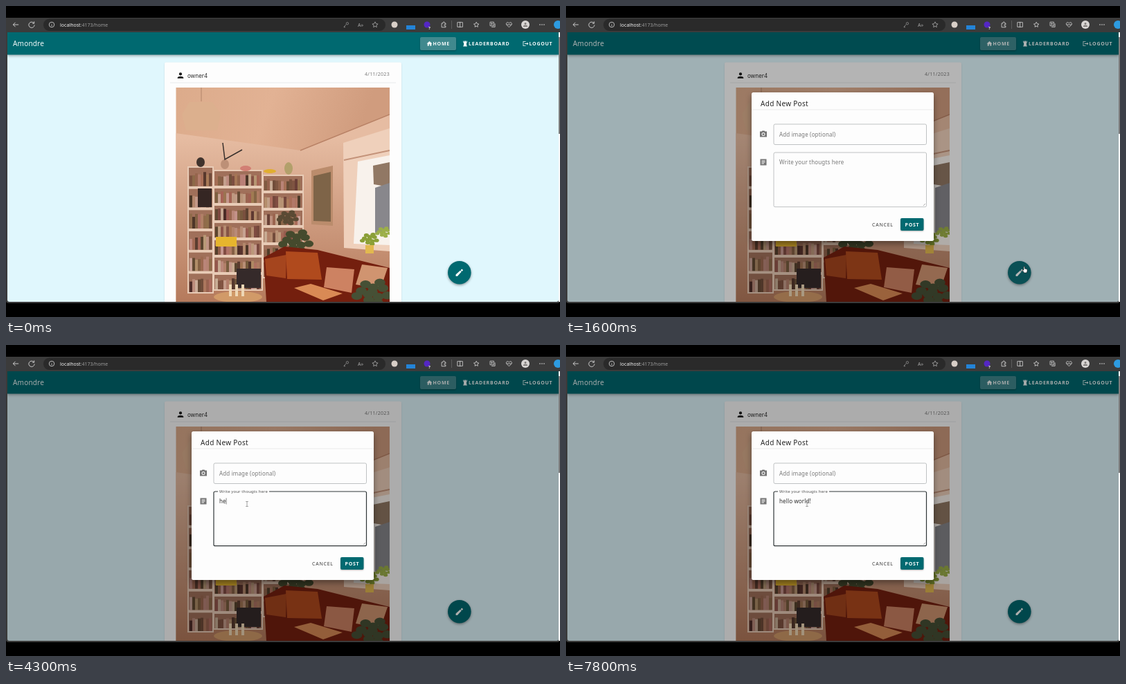
An HTML page with a canvas that plays this animation: 800x450 px, repeating every 8000 ms.

```html
<!DOCTYPE html>
<html lang="en">
<head>
<meta charset="utf-8">
<title>Add a post</title>
<style>
html, body { margin: 0; width: 100%; height: 100%; overflow: hidden; background: #000; }
canvas { display: block; }
</style>
</head>
<body>
<canvas id="stage" width="800" height="450"></canvas>
<script>
const ctx = document.getElementById('stage').getContext('2d');
const LOOP = 8000, STEP = 100;
const UI = '"Noto Sans", "Open Sans", sans-serif';
const TEAL = '#006970', PAPER = '#fdfdfd';

// Icons live on a 24-unit grid
const SOLID = {
  home: 'M10 20v-6h4v6h5v-8h3L12 3 2 12h3v8z',
  pencil: 'M21 6l-3-3-3 3 3 3M3 17v4h4L17 10l-3-3z',
  person: 'M12 4a4 4 0 0 1 0 8a4 4 0 0 1 0-8M4 20v-2c0-5 16-5 16 0v2z',
  camera: 'M2 4h5l2-2h6l2 2h5v16H2zM12 7a5 5 0 0 0 0 10a5 5 0 0 0 0-10m0 2a3 3 0 0 1 0 6a3 3 0 0 1 0-6z',
  note: 'M3 3h18v18H3zM7 7v2h10V7zm0 4v2h10v-2zm0 4v2h7v-2z',
  rook: 'M5 2h2v3h2V2h6v3h2V2h2v6h-2v11h2v3H5v-3h2V8H5z',
  logout: 'M17 7l-1 1 2 3H8v2h10l-2 3 1 1 5-5M4 5h8V3H2v18h10v-2H4z'
};
const STROKED = {
  back: 'M21 12H4M11 5l-7 7 7 7',
  reload: 'M19 7A9 9 0 1 0 21 13M20 2v6h-6',
  info: 'M12 3a9 9 0 0 1 0 18a9 9 0 0 1 0-18M12 11v6M12 7v1',
  key: 'M17 3a4 4 0 0 1 0 9a4 4 0 0 1 0-9M13 11L4 20v2h4v-3',
  star: 'M12 3l3 6 6 1-5 4 1 6-5-3-5 3 1-6-5-4 6-1z',
  puzzle: 'M5 7h5a3 3 0 1 1 5 0h4v5a3 3 0 1 0 0 4v5H5z',
  split: 'M3 4h18v16H3zM12 2v20',
  collections: 'M3 3h13v13H3zM8 20h12V8M9 6v7M6 9h7',
  heart: 'M12 21L3 12C0 6 7 1 12 7c5-6 12-1 9 5zM4 12h16'
};
for (const set of [SOLID, STROKED])
  for (const k in set) set[k] = new Path2D(set[k]);

const clamp = v => Math.max(0, Math.min(1, v));
const mix = (a, b, p) => a + (b - a) * p;
const smooth = p => p * p * (3 - 2 * p);
const progress = (t, from, length) => clamp((t - from) / length);

function rect(x, y, w, h, color) {
  ctx.fillStyle = color;
  ctx.fillRect(x, y, w, h);
}
function round(x, y, w, h, r, fill, stroke, width = 1) {
  ctx.beginPath();
  ctx.roundRect(x, y, w, h, r);
  if (fill) { ctx.fillStyle = fill; ctx.fill(); }
  if (stroke) { ctx.strokeStyle = stroke; ctx.lineWidth = width; ctx.stroke(); }
}
function oval(x, y, rx, ry, color) {
  ctx.beginPath();
  ctx.ellipse(x, y, rx, ry, 0, 0, 7);
  ctx.fillStyle = color;
  ctx.fill();
}
function trace(points) {
  ctx.beginPath();
  for (let i = 0; i < points.length; i += 2) ctx.lineTo(points[i], points[i + 1]);
}
function poly(color, ...points) {
  trace(points);
  ctx.fillStyle = color;
  ctx.fill();
}
function line(color, width, ...points) {
  trace(points);
  ctx.strokeStyle = color;
  ctx.lineWidth = width;
  ctx.stroke();
}
function text(s, x, y, size, color, weight = 400, spacing = 0.15) {
  ctx.font = `${weight} ${size}px ${UI}`;
  ctx.letterSpacing = spacing + 'px';
  ctx.fillStyle = color;
  ctx.fillText(s, x, y);
  return ctx.measureText(s).width;
}
function icon(name, x, y, size, color) {
  ctx.save();
  ctx.translate(x - size / 2, y - size / 2);
  ctx.scale(size / 24, size / 24);
  ctx.fillStyle = ctx.strokeStyle = color;
  ctx.lineWidth = 20 / size;
  if (SOLID[name]) ctx.fill(SOLID[name], 'evenodd');
  else ctx.stroke(STROKED[name]);
  ctx.restore();
}
function shaded(blur, dy, alpha, paint) {
  ctx.shadowColor = `rgba(0,0,0,${alpha})`;
  ctx.shadowBlur = blur;
  ctx.shadowOffsetY = dy;
  paint();
  ctx.shadowColor = 'transparent';
}

function toolbar() {
  const y = 27;
  rect(0, 17, 800, 21, '#3b3b3b');
  round(54, 18.5, 494, 17.5, 8.7, '#2a2a2a');
  icon('back', 14, y, 11, '#e4e4e4');
  icon('reload', 37, y, 11, '#e4e4e4');
  icon('info', 66, y, 10, '#d8d8d8');
  const w = text('localhost', 78, 30, 7, '#f4f4f4', 400, 0);
  text(':4173/home', 78 + w, 30, 7, '#9c9c9c', 400, 0);
  icon('key', 491, y, 9, '#8c8c8c');
  text('A»', 508, 30, 7, '#a8a8a8', 400, 0);
  icon('star', 533, y, 11, '#a8a8a8');
  oval(561, y, 4.5, 4.5, '#d8cfc8');
  rect(578, 28, 13, 6, '#2384d8');
  oval(608, y, 4.5, 4.5, '#5427c4');
  text('?', 610, 34, 6, '#fff', 700, 0);
  rect(643, 21, 1, 12, '#5c5c5c');
  ['puzzle', 'split', 'star', 'collections', 'heart'].forEach((name, i) =>
    icon(name, 632 + 23.6 * i, y, 10, '#d4d4d4'));
  oval(750, y, 6, 6, '#d9d6d4');
  icon('person', 750, y, 9, '#807c7a');
  for (let x = 771; x < 780; x += 3) oval(x, y, 0.8, 0.8, '#dcdcdc');
  oval(797, y, 6, 6, '#2d9be0');
}

// Bookcase: rows of seeded spines
function shelf(x, y, w, bottom, rows, rand) {
  rect(x, y, w, bottom - y, '#e8cbb6');
  const pitch = (bottom - y) / rows;
  for (let r = 0; r < rows; r++) {
    const top = y + r * pitch + 2, base = top + pitch - 4;
    rect(x + 2, top, w - 4, base - top, '#a0705a');
    for (let bx = x + 3; bx < x + w - 6; bx += 4) {
      const h = pitch * mix(0.5, 0.7, rand());
      rect(bx, base - h, 4, h, `hsl(${mix(8, 32, rand())} 32% ${mix(22, 70, rand())}%)`);
    }
  }
}

function leaves(x, y, r, color) {
  for (let i = 0; i < 12; i++) {
    const a = i * 2.4, d = r * Math.sqrt(i / 12);
    oval(x + d * Math.cos(a), y + d * 0.6 * Math.sin(a), r * 0.28, r * 0.2, color);
  }
}

// Room picture in a few flat tones
function photo() {
  let seed = 11;
  const rand = () => (seed = (seed * 16807) % 2147483647) / 2147483647;
  ctx.save();
  ctx.beginPath();
  ctx.rect(245.5, 118, 308.5, 310);
  ctx.clip();
  const ceiling = ctx.createLinearGradient(246, 118, 500, 210);
  ceiling.addColorStop(0, '#dcab8b');
  ceiling.addColorStop(0.5, '#e2b294');
  ceiling.addColorStop(1, '#d09c7e');
  rect(245, 118, 310, 310, ceiling);
  const wall = ctx.createLinearGradient(0, 190, 0, 428);
  wall.addColorStop(0, '#e6bca2');
  wall.addColorStop(1, '#b57a5c');
  poly(wall, 245, 184, 425, 209, 554, 157, 554, 428, 245, 428);
  line('#b98266', 1.5, 425, 209, 554, 157);

  line('#a87d62', 0.8, 282, 118, 282, 138);
  poly('#dcb08e', 265, 139, 298, 139, 310, 156, 305, 180, 260, 180, 254, 157);

  shelf(262, 232, 38, 416, 6, rand);
  shelf(299, 237, 72, 412, 7, rand);
  shelf(370, 244, 60, 394, 6, rand);
  rect(277, 264, 20, 27, '#352623');
  rect(303, 334, 30, 14, '#e6b52e');
  rect(333, 380, 35, 28, '#352a2a');
  oval(281, 226, 6, 7, '#40332d');
  oval(316, 229, 6, 7, '#bd9077');
  line('#38302c', 1.5, 316, 222, 313, 198, 316, 222, 341, 208);
  oval(346, 235, 8, 4, '#d27f74');
  oval(381, 239, 9, 3, '#e0ae30');
  oval(408, 235, 6, 9, '#b2a06b');
  leaves(407, 306, 15, '#5a4a34');
  leaves(419, 340, 24, '#454a2d');

  poly('#bb8c6c', 441, 238, 472, 231, 472, 318, 441, 316);
  poly('#7e6448', 444, 246, 469, 240, 469, 312, 444, 311);

  poly('#efd0bb', 487, 198, 554, 177, 554, 355, 488, 350);
  line('#c4937a', 2, 488, 223, 554, 209);
  poly('#f8f2ec', 508, 225, 554, 216, 554, 346, 502, 344);
  poly('#917864', 530, 231, 554, 226, 554, 262, 531, 258);
  poly('#88878c', 533, 263, 554, 256, 554, 326, 533, 328);
  leaves(525, 337, 13, '#8b9f37');
  leaves(545, 327, 11, '#9caf48');
  rect(519, 346, 12, 12, '#e2b94f');

  poly('#741f0e', 372, 364, 402, 348, 450, 353, 554, 379, 554, 428, 376, 428);
  poly('#d98a55', 416, 408, 440, 402, 486, 416, 458, 426);
  poly('#a5451e', 374, 366, 405, 360, 404, 394, 376, 390);
  poly('#b04a1d', 404, 355, 450, 357, 456, 396, 406, 395);
  poly('#cd8262', 463, 378, 503, 381, 499, 415, 459, 407);
  poly('#d09470', 514, 374, 551, 379, 541, 409, 505, 403);
  leaves(529, 414, 28, '#465035');
  oval(335, 421, 35, 8, '#d19a68');
  for (let x = 322; x < 345; x += 9) rect(x, 403, 4, 17, '#eed7b5');
  ctx.restore();
}

function header() {
  shaded(4, 1.5, 0.35, () => rect(2, 38, 796, 32.5, TEAL));
  text('Amondre', 10, 58, 10, '#f4fafa', 500, 0.2);
  shaded(2, 1, 0.3, () => round(598, 45, 52, 19, 2, '#40898e'));
  for (const [name, x] of [['home', 616.5], ['rook', 668], ['logout', 755.5]]) {
    const label = name === 'rook' ? 'leaderboard' : name;
    icon(name, x - 5, 54.5, 9.5, '#f4fafa');
    text(label.toUpperCase(), x, 57, 7, '#f4fafa', 600, 0.75);
  }
}

function page() {
  rect(2, 38, 796, 390, '#e0f7fd');
  shaded(2, 1, 0.15, () => round(229, 81.5, 342, 360, 2, PAPER));
  icon('person', 252, 100.5, 13, '#1c1c1c');
  text('owner4', 262, 103.5, 8, '#2a2a2a', 400, 0.1);
  text('4/11/2023', 518, 101, 7, '#7c7c7c', 400, 0.3);
  rect(237, 110.5, 326, 1, '#e8eaeb');
  photo();
  header();
}

function fabTint(t) {
  if (t < 1500) return 0.5 * progress(t, 500, 500);
  if (t < 1600) return 0.14;
  return 0.055 * (1 - progress(t, 2600, 700));
}

function fab(t) {
  const x = 654.8, y = 385.7, r = 16.8;
  const lift = t >= 1200 && t < 1500 ? 2.5 : 1.5;
  shaded(lift * 2.5, lift, 0.4, () => oval(x, y, r, r, TEAL));
  oval(x, y, r, r, `rgba(255,255,255,${fabTint(t)})`);
  icon('pencil', x, y, 14, '#fff');
}

// Each burst types its letters at a steady pace
const BURSTS = [
  { letters: 'hello', at: 4120, every: 180 },
  { letters: ' w', at: 5420, every: 290 },
  { letters: 'orld!', at: 5850, every: 315 }
];

function typing(t) {
  let message = '', last = -LOOP;
  for (const { letters, at, every } of BURSTS) {
    if (t < at) break;
    const n = Math.min(letters.length, Math.floor((t - at) / every) + 1);
    message += letters.slice(0, n);
    last = at + (n - 1) * every;
  }
  return { message, caret: t - last < 500 };
}

function thoughts(t) {
  const focused = t >= 2700, hovered = t >= 2200;
  const edge = focused ? '#303638' : hovered ? '#5a5f61' : '#b8bcbd';
  round(300, 212, 220.5, 78.7, 2, null, edge, focused ? 1.2 : 0.9);
  line('#777', 0.6, 516, 289, 519, 286);

  const lift = smooth(progress(t, 2650, 200)), scale = mix(1, 0.75, lift);
  if (lift) rect(306, 210.5, 74 * lift, 3, PAPER);
  ctx.save();
  ctx.translate(308, mix(229, 214, lift));
  ctx.scale(scale, scale);
  text('Write your thougts here', 0, 0, 8, lift ? '#555' : '#777');
  ctx.restore();

  const { message, caret } = typing(t);
  const w = text(message, 308, 228.5, 8, '#2c2c2c');
  if (caret) rect(308 + w, 221.5, 0.6, 9, '#333');
}

function dialog(t) {
  const p = progress(t, 1420, 150);
  if (!p) return;
  const scale = 1 - 0.2 * (1 - p) ** 3, cx = 399.5, cy = 232.5;
  ctx.save();
  ctx.globalAlpha = 1 - (1 - p) ** 2.7;
  ctx.translate(cx, cy);
  ctx.scale(scale, scale);
  ctx.translate(-cx, -cy);
  shaded(9, 4, 0.4, () => round(268, 125, 263, 215, 2.5, PAPER));
  text('Add New Post', 281, 144.5, 10, '#262626', 500, 0.3);
  rect(268, 149.5, 263, 1, '#ececec');

  icon('camera', 285, 185.5, 12, '#747474');
  icon('note', 285, 226, 12, '#747474');
  round(300, 171, 220.5, 29.5, 2, null, '#b8bcbd', 0.9);
  text('Add image (optional)', 308, 188.5, 8, '#777');
  thoughts(t);

  text('CANCEL', 442, 319, 7, '#3c3c3c', 500, 0.75);
  shaded(2, 1, 0.3, () => round(483, 307, 33.5, 18, 2, TEAL));
  text('POST', 489.5, 319, 7, '#fff', 600, 0.75);
  ctx.restore();
}

function pointerAt(t) {
  if (t >= 2400) return [348, 230];
  const enter = smooth(progress(t, 600, 400)), go = smooth(progress(t, 1600, 700));
  return [mix(666 - 3 * enter, 348, go), mix(390 - 9 * enter, 237, go)];
}

function pointer(t) {
  if (t < 600) return;
  const [x, y] = pointerAt(t);
  ctx.save();
  ctx.translate(x, y);
  if (t >= 2200) {
    line('#8a8a8a', 0.8, 0, -3.5, 0, 3.5);
    for (const end of [-3.5, 3.5]) line('#8a8a8a', 0.8, -1.8, end, 1.8, end);
  } else {
    const shape = t <= 1600
      ? [-2, -4, -0.5, -4, -0.5, -1, 3, 0, 3, 3, 2, 5, -1.5, 5, -4, 1, -2, 1, -2, -4]
      : [0, 0, 0, 9, 2, 7, 4, 10, 5, 9, 4, 6.5, 6.5, 6.5, 0, 0];
    poly('#fff', ...shape);
    line('#222', 0.6, ...shape);
  }
  ctx.restore();
}

function draw(t) {
  rect(0, 0, 800, 450, '#000');
  round(0, 17, 800, 413, [0, 0, 4, 4], '#3b3b3b');
  ctx.save();
  ctx.beginPath();
  ctx.roundRect(2, 37.5, 796, 390.5, [0, 0, 3, 3]);
  ctx.clip();
  page();
  fab(t);
  rect(2, 37, 796, 392, `rgba(0,0,0,${0.32 * progress(t, 1395, 225)})`);
  dialog(t);
  pointer(t);
  ctx.restore();
  toolbar();
  rect(798, 38, 2, 390, '#fafafa');
  rect(798, 45, 2, 140, '#7d7d7d');
}

const start = performance.now();
let shown = -1;
function tick() {
  const t = Math.floor((performance.now() - start) % LOOP / STEP) * STEP;
  if (t !== shown) draw(shown = t);
  requestAnimationFrame(tick);
}
tick();
</script>
</body>
</html>
```
